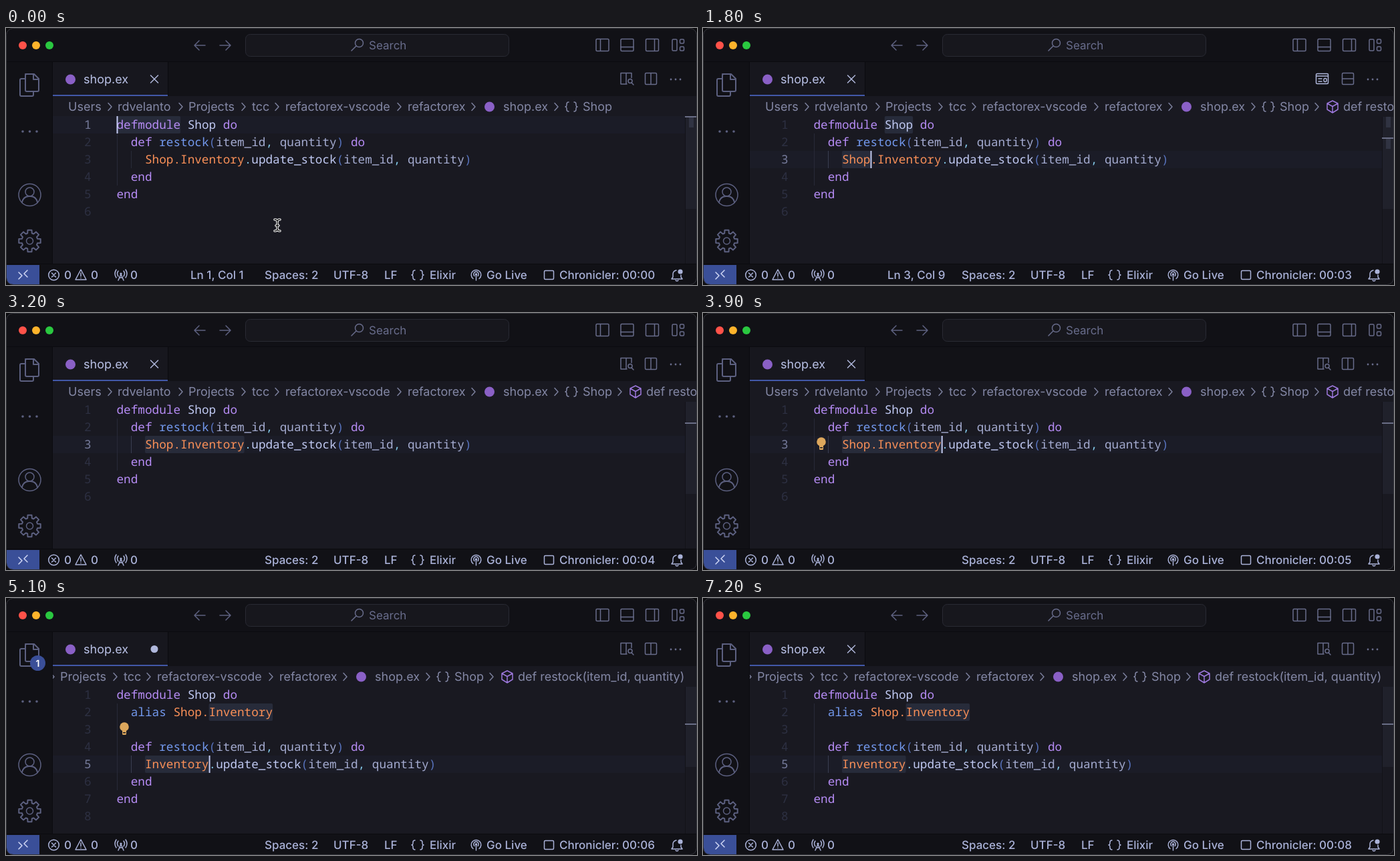
An HTML page that plays this animation: 1034x385 px, repeating every 7600 ms.

```html
<!DOCTYPE html>
<html lang="en">
<head>
<meta charset="utf-8">
<title>Editor</title>
<style>
html, body { margin: 0; width: 100%; height: 100%; overflow: hidden; background: #0b0b0e; }
svg { display: block; width: 1034px; height: 385px; }
text { white-space: pre; font: 18px Inter, sans-serif; text-rendering: geometricPrecision; }
.code { font: 17.7px "Noto Sans Mono", monospace; }
.status { font-size: 17px; font-weight: 500; fill: #aab2d8; }
.crumb { fill: #8488a6; }
.line { fill: none; stroke-width: 1.5; stroke-linecap: round; stroke-linejoin: round; }
</style>
</head>
<body>
<svg id="stage" viewBox="0 0 1034 385"></svg>
<script>
const LOOP = 7600, CHAR = 10.62, LEFT = 165.5, EDIT = 4800;
const C = {
  chrome: '#111116', editor: '#191921', edge: '#0b0b0f', blue: '#3a4f98',
  icon: '#686c8b', side: '#5c6080', light: '#aab2d8', mark: '#8a60c6',
  key: '#b68cf5', fn: '#7399ee', paren: '#5873bd', arg: '#a4abd0',
  mod: '#fa9058', name: '#c0c9f2', comma: '#82c8e8'
};

// Shape helpers
const rect = (x, y, w, h, fill, more = '') =>
  `<rect x="${x}" y="${y}" width="${w}" height="${h}" fill="${fill}" ${more}/>`;
const dot = (x, y, r, fill) => `<circle cx="${x}" cy="${y}" r="${r}" fill="${fill}"/>`;
const path = (d, color, more = '') => `<path class="line" d="${d}" stroke="${color}" ${more}/>`;
const ring = (x, y, r, color) => `<circle class="line" cx="${x}" cy="${y}" r="${r}" stroke="${color}"/>`;
const box = (x, y, w, h, color) =>
  `<rect class="line" x="${x}" y="${y}" width="${w}" height="${h}" rx="1.5" stroke="${color}"/>`;
const label = (x, y, s, more = '') => `<text x="${x}" y="${y}" ${more}>${s}</text>`;
const status = (x, s, id = '') => label(x, 376, s, `class="status" id="${id}"`);
const dots = (x, y, gap, r, color) => [-gap, 0, gap].map(d => dot(x + d, y, r, color)).join('');
const cross = (x, y, r, color) =>
  path(`M${x - r} ${y - r}l${2 * r} ${2 * r}m0 ${-2 * r}l${-2 * r} ${2 * r}`, color);
const braces = (x, y, color) => path(
  `M${x - 4} ${y - 7}q-3 0-3 3v1.5q0 2-2 2.5q2 .5 2 2.5v1.5q0 3 3 3` +
  `M${x + 4} ${y - 7}q3 0 3 3v1.5q0 2 2 2.5q-2 .5-2 2.5v1.5q0 3-3 3`, color);

// Visible only during the listed [from, to] pairs
const on = (spans, body) => `<g data-on="${spans}">${body}</g>`;

// Code helpers
const rowTop = n => 106 + n * 26;
const colX = c => LEFT + c * CHAR;
const tokens = (n, list) => {
  let col = 0;
  return list.map(([color, s]) => {
    const out = color ? label(colX(col), rowTop(n) + 19, s, `class="code" fill="${C[color]}"`) : '';
    col += s.length;
    return out;
  }).join('');
};
const number = (n, color) =>
  label(127.5, rowTop(n) + 19, n, `class="code" text-anchor="end" fill="${color}"`);
const guide = (c, from, to, color = '#282a38') =>
  rect(Math.round(colX(c)), rowTop(from), 1, (to - from + 1) * 26, color);
const shade = (n, c, len) =>
  rect(colX(c), rowTop(n), len * CHAR, 26, '#272b3a', 'rx="2"');
const caret = (n, c, spans) => on(spans, rect(colX(c), rowTop(n), 2, 26, '#c4ccf2'));

const signature = [['', '  '], ['key', 'def'], ['', ' '], ['fn', 'restock'], ['paren', '('],
  ['arg', 'item_id'], ['comma', ','], ['', ' '], ['arg', 'quantity'], ['paren', ')'], ['', ' '], ['key', 'do']];
const call = [['comma', '.'], ['name', 'update_stock'], ['paren', '('], ['arg', 'item_id'],
  ['comma', ','], ['', ' '], ['arg', 'quantity'], ['paren', ')']];
const opening = [['key', 'defmodule'], ['', ' '], ['name', 'Shop'], ['', ' '], ['key', 'do']];
const innerEnd = [['', '  '], ['key', 'end']], outerEnd = [['key', 'end']];

function frame() {
  return rect(0, 0, 1034, 385, C.chrome, 'rx="10"') +
    rect(70, 51, 963, 51, '#121217') + rect(70, 51, 172, 51, '#17171e') +
    rect(70, 102, 963, 252, C.editor) +
    rect(1, 50, 1032, 1, C.edge) + rect(242, 51, 1, 50, C.edge) +
    rect(69, 51, 1, 303, C.edge) + rect(70, 100, 172, 2, '#4258a8');
}

function titleBar() {
  const i = C.icon;
  return dot(25, 26, 6, '#ff5249') + dot(45, 26, 6, '#fdb32b') + dot(65, 26, 6, '#2ac840') +
    path('M298 26h-16m7-7l-7 7 7 7M320 26h16m-7-7l7 7-7 7', '#5d6180') +
    rect(358.5, 9.5, 394, 33, '#17171d', 'rx="7" stroke="#292a33"') +
    ring(528.5, 22.5, 6, i) + path('M524 27l-7 7', i) +
    label(543, 32, 'Search', `fill="${i}" style="font-size:17px"`) +
    box(883, 16.5, 19, 18, i) + path('M889.5 17v17', i) +
    box(920, 16.5, 19, 18, i) + path('M920 28.5h19', i) +
    box(957.5, 16.5, 19, 18, i) + path('M970.5 17v17', i) +
    box(997, 17, 7, 17, i) + box(1008.5, 17, 6, 6, i) + box(1008.5, 28, 6, 6, i);
}

function sideBar() {
  const s = C.side;
  let gear = '';
  for (let k = 0; k < 8; k++) {
    for (const [off, r] of [[-.28, 12], [-.18, 16.5], [.18, 16.5], [.28, 12]]) {
      const a = k * Math.PI / 4 + off;
      gear += `${gear ? 'L' : 'M'}${(35.5 + r * Math.cos(a)).toFixed(1)} ${(319 + r * Math.sin(a)).toFixed(1)}`;
    }
  }
  return `<g style="--w:2">` +
    path('M29 69h13l7 7v17q0 2-2 2H31q-2 0-2-2V71q0-2 2-2M41 69v8h8M28 76h-5q-2 0-2 2v22q0 2 2 2h16q2 0 2-2v-4', s, 'style="stroke-width:2"') +
    dots(35.5, 155, 10.5, 1.8, s) +
    `<g style="stroke-width:2">` + ring(35.5, 250, 16.5, s) + ring(35.5, 245.5, 6.5, s) +
    path('M24 261q2-9 11.5-9t11.5 9', s, 'style="stroke-width:2"') +
    path(gear + 'Z', s, 'style="stroke-width:2"') + ring(35.5, 319, 5, s) + `</g></g>` +
    on([4900, 5300], dot(47.5, 97.5, 11.5, C.blue) +
      label(47.5, 102.5, '1', 'text-anchor="middle" fill="#fff" style="font-size:14px;font-weight:600"'));
}

function tabBar() {
  const i = C.icon;
  return dot(96.5, 77, 7.5, C.mark) + label(116, 83, 'shop.ex', `fill="#b9c1e6"`) +
    on([0, EDIT, 5300, LOOP], cross(222, 76.5, 5.5, '#b0b8dc')) +
    on([EDIT, 5300], dot(222, 76.5, 5.5, '#b0b8dc')) +
    on([0, 1300, 3100, LOOP],
      path('M929 84h-9V67.500h16v7M928 68v16', i) + ring(934, 79.5, 3, i) + path('M936 82l3 3', i) +
      box(956.5, 67.5, 17, 17, i) + path('M965 68v16', i)) +
    on([1300, 3100],
      box(917.5, 68.5, 18, 15, '#b0b8dc') + path('M918 72h17M921 76h5m-5 4h5', '#b0b8dc') +
      box(929, 75.5, 4, 5, '#b0b8dc') +
      box(956.5, 67.5, 17, 17, i) + path('M957 76h16', i)) +
    dots(1002, 77, 7, 1.4, i);
}

function breadcrumbs() {
  const crumb = (x, s) => label(x, 124, s, 'class="crumb"');
  const arrow = x => path(`M${x - 3} 112.500l5 5.500-5 5.500`, '#7c809d');
  const names = [[93, 'Users'], [167, 'rdvelanto'], [273, 'Projects'], [368, 'tcc'],
    [418, 'refactorex-vscode'], [601, 'refactorex'], [744, 'shop.ex'], [863, 'Shop']];
  return `<clipPath id="bar"><rect x="70" y="102" width="963" height="30"/></clipPath>` +
    `<g clip-path="url(#bar)"><g id="crumbs">` +
    names.map(n => crumb(...n)).join('') +
    [156, 262, 356, 406, 589, 700, 824].map(arrow).join('') +
    dot(723.5, 118, 7.5, C.mark) + braces(846, 118, '#8488a6') +
    on([1100, LOOP], arrow(919) +
      path('M942 109l8 4v9l-8 5-8-5v-9zM934 113l8 4.500 8-4.500M942 117.500v9', '#9d78dc') +
      crumb(958, 'def restock(item_id, quantity)')) +
    `</g></g>`;
}

function code() {
  const active = [[1, 0, 900], [2, 900, 1000], [3, 1000, EDIT], [5, EDIT, LOOP]];
  const rows = list => list.map((t, k) => tokens(k + 1, t)).join('');
  const nums = (from, to) => {
    let s = '';
    for (let n = from; n <= to; n++) s += number(n, '#2d3042');
    return s;
  };
  const before = [opening, signature,
    [['', '    '], ['mod', 'Shop.Inventory'], ...call], innerEnd, outerEnd];
  const after = [opening, [['', '  '], ['fn', 'alias'], ['', ' '], ['mod', 'Shop.Inventory']], [],
    signature, [['', '    '], ['mod', 'Inventory'], ...call], innerEnd, outerEnd];

  return active.map(([n, a, b]) => on([a, b], rect(70, rowTop(n), 947, 26, '#1b1c27'))).join('') +
    nums(1, 6) + on([EDIT, LOOP], nums(7, 8)) +
    active.map(([n, a, b]) => on([a, b], number(n, '#747998'))).join('') +
    on([0, EDIT], guide(0, 2, 4) + guide(2, 3, 3)) +
    on([1000, EDIT], guide(2, 3, 3, '#3a3d51')) +
    on([EDIT, LOOP], guide(0, 2, 6) + guide(2, 5, 5, '#3a3d51')) +
    on([0, 900], shade(1, 0, 9)) +
    on([1700, 2800], shade(1, 10, 4) + shade(3, 4, 4)) +
    on([2800, EDIT], shade(3, 4, 14)) +
    on([EDIT, LOOP], shade(2, 13, 9) + shade(5, 4, 9)) +
    on([0, EDIT], rows(before)) + on([EDIT, LOOP], rows(after)) +
    caret(1, 0, [0, 900]) + caret(2, 0, [900, 1000]) + caret(3, 0, [1000, 1500]) +
    caret(3, 8, [1500, 2000, 2500, 2800]) + caret(3, 4, [2000, 2500]) +
    caret(3, 18, [2800, 3200, 3700, EDIT]) +
    caret(5, 13, [EDIT, 5200, 5700, 6300, 6800, 7200]) +
    on([3700, 5400], dot(177, 193, 6.8, '#dda75c') + rect(174, 197, 6, 8, '#dda75c', 'rx="1.5"') +
      rect(175, 201, 4, 1.5, C.editor)) +
    on([0, 900],
      path('M402 287q4 0 4 3 0-3 4-3M406 290v11M402 304q4 0 4-3 0 3 4 3M404 296h4', '#fff', 'style="stroke-width:3.5"') +
      path('M402 287q4 0 4 3 0-3 4-3M406 290v11M402 304q4 0 4-3 0 3 4 3M404 296h4', '#111', 'style="stroke-width:1.3"'));
}

function ruler() {
  const cursor = y => rect(1016, y, 17, 2, '#6a6e86');
  const hit = y => rect(1022, y, 7, 16, '#303342');
  return rect(1016, 133, 1, 221, '#121218') +
    on([0, EDIT], rect(1017, 133, 16, 138, '#20212b')) +
    on([EDIT, LOOP], rect(1017, 133, 16, 120, '#20212b')) +
    on([0, 900], hit(133) + cursor(132)) + on([900, 1000], cursor(148)) +
    on([1700, 2800], hit(133) + hit(165)) +
    on([1000, EDIT], cursor(164)) + on([EDIT, LOOP], cursor(188));
}

function statusBar() {
  const l = C.light;
  return rect(1, 354, 1032, 30, C.chrome) + rect(1, 353, 1032, 1, C.edge) +
    path('M1 355h49v29H11q-10 0-10-10z', 'none', `style="fill:${C.blue}"`) +
    path('M19 366l5 5-5 5M32 363l-5 5 5 5', '#d0d7f5') +
    ring(71.5, 370, 7.8, l) + cross(71.5, 370, 3, l) + status(87, '0') +
    path('M112 362l8 15h-16zM112 367v5m0 2.500v.1', l) + status(127, '0') +
    path('M172 369l-4 9m4-9l4 9m-6.500-4h5M168 372q-3-4 0-8M176 372q3-4 0-8M165 374q-4-6 0-12M179 374q4-6 0-12', l) +
    dot(172, 368, 1.6, l) + status(186, '0') +
    status(276, '', 'place') + status(387, 'Spaces: 2') + status(490, 'UTF-8') + status(566, 'LF') +
    braces(616, 370, l) + status(634, 'Elixir') +
    path('M699 375.500a7.300 7.300 0 1 1 9 0M701 371.500a3.700 3.700 0 1 1 5 0M703.500 370v8', l) +
    dot(703.5, 369, 1.8, l) + status(719, 'Go Live') +
    box(805.5, 363.5, 14, 13, l) + status(828, '', 'clock') +
    path('M1003 363q-5 1-5 6v4l-2 3h16l-2-3v-3M1002 378q2 2 4 0', l) + dot(1009, 365, 3.6, l);
}

const stage = document.getElementById('stage');
stage.innerHTML = frame() + titleBar() + sideBar() + tabBar() + breadcrumbs() + code() + ruler() +
  statusBar() + rect(.5, .5, 1033, 384, 'none', 'rx="10" stroke="#34353c"');

const timed = [...stage.querySelectorAll('[data-on]')].map(el => ({
  el, spans: el.dataset.on.split(',').map(Number)
}));
const [place, clock, crumbs] = ['place', 'clock', 'crumbs'].map(id => document.getElementById(id));
const places = [[0, 'Ln 1, Col 1'], [900, 'Ln 2, Col 1'], [1000, 'Ln 3, Col 1'],
  [1500, 'Ln 3, Col 9'], [2000, 'Ln 3, Col 5'], [2500, '']];
const ticks = [0, 200, 700, 1700, 2700, 3700, 4800, 5700, 6700];

const within = (t, s) => s.some((a, k) => k % 2 === 0 && t >= a && t < s[k + 1]);

function draw(t) {
  for (const { el, spans } of timed) el.style.display = within(t, spans) ? '' : 'none';
  place.textContent = places.filter(p => p[0] <= t).pop()[1];
  clock.textContent = 'Chronicler: 00:0' + (ticks.filter(k => k <= t).length - 1);
  crumbs.setAttribute('transform', `translate(${t < 5000 ? 0 : -192})`);
}

function loop() {
  draw(performance.now() % LOOP);
  requestAnimationFrame(loop);
}
loop();
</script>
</body>
</html>
```
